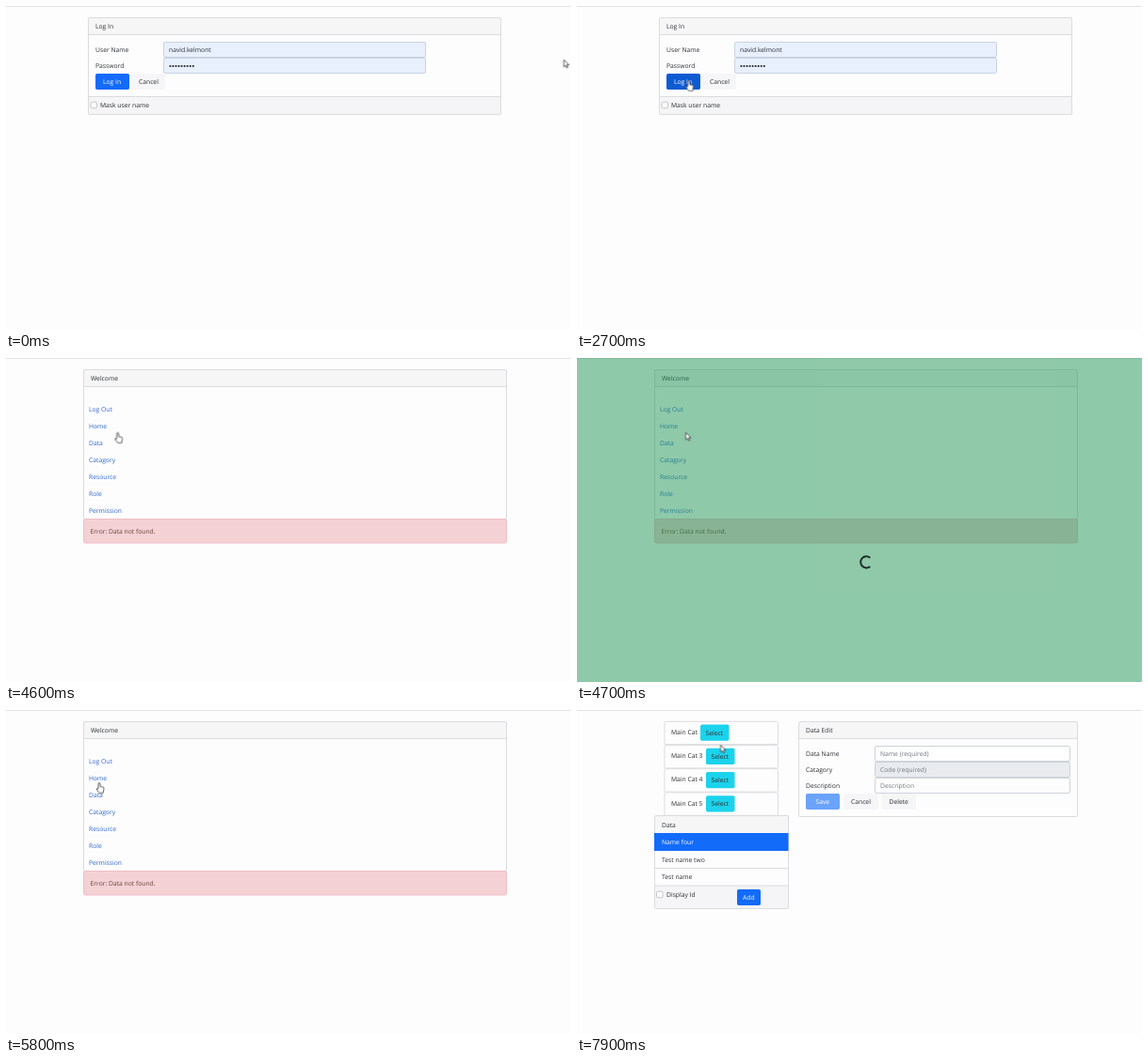
Recreate the animation shown at these times as an HTML page. Size 600 by 345 pixels, loop 8 s.

```html
<!DOCTYPE html>
<html lang="en">
<head>
<meta charset="utf-8">
<title>Log in and edit data</title>
<style>
html, body { margin: 0; width: 100%; height: 100%; overflow: hidden; background: #fefdfe; }
svg { display: block; width: 100vw; height: 100vh; }
text { font: 6.75px "Open Sans", "Noto Sans", sans-serif; fill: #2b2f33; text-rendering: geometricPrecision; white-space: pre; }

.panel { fill: #fefdfe; stroke: #dcdcdf; }
.bar { fill: #f6f6f7; stroke: #dcdcdf; }
.foot { fill: #f5f4f6; stroke: #dcdcdf; }
.input { fill: #fefdfe; stroke: #ced3d9; }
.filled { fill: #e8f0fd; stroke: #c9d3e2; }
.locked { fill: #e9ebef; stroke: #ced3d9; }
.check { fill: #fff; stroke: #c4c4c8; }
.primary { fill: #136bfa; }
.faded { fill: #6ba3fb; }
.info { fill: #1cd3ec; }
.light { fill: #f6f6f8; }
.on { fill: #fff; }
.hint text { fill: #747a82; }
.links text { fill: #2f68cc; }
.alert { fill: #f3d1d5; stroke: #efbfc5; }
.alert-text { fill: #694235; }

/* One percent of the loop is 80 ms. */
.timed { animation: 8s step-end infinite; }
#login { animation-name: login; }
#hover { animation-name: hover; }
#welcome { animation-name: welcome; }
#loading { animation-name: loading; }
#data { animation-name: data; }
#arrow { animation-name: arrow; }
#hand { animation-name: hand; }
#pointer { animation: move 8s step-end infinite; }

@keyframes login { 0% { opacity: 1 } 56.25%, 100% { opacity: 0 } }
@keyframes hover { 0% { fill: #136bfa } 33.75%, 100% { fill: #0d5bd3 } }
@keyframes welcome { 0% { opacity: 0 } 56.25% { opacity: 1 } 81.25%, 100% { opacity: 0 } }
@keyframes loading { 0% { opacity: 0 } 58.75% { opacity: 1 } 60%, 100% { opacity: 0 } }
@keyframes data { 0% { opacity: 0 } 81.25%, 100% { opacity: 1 } }
@keyframes arrow {
  0% { opacity: 1 } 1.25% { opacity: 0 }
  25% { opacity: 1 } 33.75% { opacity: 0 }
  58.75% { opacity: 1 } 60% { opacity: 0 }
  81.25%, 100% { opacity: 1 }
}
@keyframes hand {
  0% { opacity: 0 } 33.75% { opacity: 1 }
  58.75% { opacity: 0 } 60% { opacity: 1 }
  81.25%, 100% { opacity: 0 }
}
@keyframes move {
  0% { transform: translate(592.4px, 57.2px) }
  25% { transform: translate(501px, 121px); animation-timing-function: steps(7) }
  33.75% { transform: translate(118.6px, 79.6px) }
  58.75% { transform: translate(115.5px, 79.4px) }
  60% { transform: translate(118.6px, 79.6px); animation-timing-function: steps(8) }
  70% { transform: translate(106px, 55px); animation-timing-function: steps(4) }
  75% { transform: translate(92px, 100px); animation-timing-function: steps(4) }
  80% { transform: translate(100.5px, 87.3px) }
  81.25% { transform: translate(100.5px, 87.3px); animation-timing-function: steps(9) }
  92.5% { transform: translate(326px, 199px); animation-timing-function: steps(5) }
  98.75%, 100% { transform: translate(152.5px, 37.3px) }
}
</style>
</head>
<body>
<svg viewBox="0 0 600 345" preserveAspectRatio="none">
  <rect width="600" height="345" fill="#fefdfe"/>
  <rect width="600" height="1" fill="#e3e2e5"/>

  <g id="login" class="timed">
    <rect class="panel" x="87.5" y="12.5" width="438" height="103" rx="1.5"/>
    <rect class="bar" x="87.5" y="12.5" width="438" height="18" rx="1.5"/>
    <rect class="foot" x="87.5" y="96.5" width="438" height="19" rx="1.5"/>
    <text x="95" y="23.9">Log In</text>
    <text x="95" y="49">User Name</text>
    <text x="95" y="66">Password</text>
    <rect class="filled" x="167.5" y="38.5" width="278" height="16" rx="1.5"/>
    <rect class="filled" x="167.5" y="55.5" width="278" height="16" rx="1.5"/>
    <text x="173" y="49">navid.kelmont</text>
    <line x1="174.4" y1="64" x2="199.5" y2="64" stroke="#222" stroke-width="2.1" stroke-linecap="round" stroke-dasharray="0 3.05"/>
    <rect id="hover" class="timed" x="95" y="72" width="36" height="17" rx="1.8"/>
    <text class="on" x="103" y="83">Log In</text>
    <rect class="light" x="133" y="72" width="36" height="17" rx="1.8"/>
    <text x="141" y="83">Cancel</text>
    <rect class="check" x="90" y="102.2" width="6.6" height="6.6" rx="1.5"/>
    <text x="100" y="108.2">Mask user name</text>
  </g>

  <g id="welcome" class="timed">
    <rect class="panel" x="82.5" y="12.5" width="449" height="159" rx="1.5"/>
    <rect class="bar" x="82.5" y="12.5" width="449" height="18" rx="1.5"/>
    <text x="90" y="23.9">Welcome</text>
    <g class="links">
      <text x="88" y="56.7">Log Out</text>
      <text x="88" y="74.7">Home</text>
      <text x="88" y="92.7">Data</text>
      <text x="88" y="110.7">Catagory</text>
      <text x="88" y="128.7">Resource</text>
      <text x="88" y="146.7">Role</text>
      <text x="88" y="164.7">Permission</text>
    </g>
    <rect class="alert" x="82.5" y="171.5" width="449" height="25.5" rx="1.5"/>
    <text class="alert-text" x="89.5" y="186.9">Error: Data not found.</text>
  </g>

  <g id="loading" class="timed">
    <rect width="600" height="345" fill="rgb(32 150 86)" fill-opacity=".5"/>
    <path d="M311.3 212.7a6.1 6.1 0 1 0 0 9.2" fill="none" stroke="#1d2f27" stroke-width="2"/>
  </g>

  <g id="data" class="timed">
    <g id="categories"></g>

    <rect class="panel" x="82.5" y="112.5" width="142" height="99" rx="1.5"/>
    <rect class="bar" x="82.5" y="112.5" width="142" height="19" rx="1.5"/>
    <rect class="foot" x="82.5" y="187" width="142" height="24.5" rx="1.5"/>
    <text x="90" y="124.6">Data</text>
    <rect class="primary" x="82" y="131" width="142.5" height="19"/>
    <text class="on" x="90" y="143.4">Name four</text>
    <text x="90" y="161.8">Test name two</text>
    <path d="M83 168.5H224" stroke="#dcdcdf"/>
    <text x="90" y="180.2">Test name</text>
    <rect class="check" x="84.5" y="193.2" width="6.6" height="6.6" rx="1.5"/>
    <text x="95" y="199.1">Display Id</text>
    <rect class="primary" x="170" y="191" width="25" height="17" rx="1.8"/>
    <text class="on" x="176" y="202.2">Add</text>

    <rect class="panel" x="235.5" y="12.5" width="296" height="101" rx="1.5"/>
    <rect class="bar" x="235.5" y="12.5" width="296" height="18" rx="1.5"/>
    <text x="243" y="23.9">Data Edit</text>
    <text x="243" y="49">Data Name</text>
    <text x="243" y="66">Catagory</text>
    <text x="243" y="83">Description</text>
    <rect class="input" x="316.5" y="38.5" width="207" height="16" rx="1.5"/>
    <rect class="locked" x="316.5" y="55.5" width="207" height="16" rx="1.5"/>
    <rect class="input" x="316.5" y="72.5" width="207" height="16" rx="1.5"/>
    <g class="hint">
      <text x="322" y="49">Name (required)</text>
      <text x="322" y="66">Code (required)</text>
      <text x="322" y="83">Description</text>
    </g>
    <rect class="faded" x="243" y="89" width="36" height="17" rx="1.8"/>
    <rect class="light" x="283" y="89" width="37" height="17" rx="1.8"/>
    <rect class="light" x="323.5" y="89" width="36.5" height="17" rx="1.8"/>
    <text class="on" x="253.5" y="100">Save</text>
    <text x="291" y="100">Cancel</text>
    <text x="331.5" y="100">Delete</text>
  </g>

  <g id="pointer" stroke="#3a3a3e" stroke-width=".8" stroke-linejoin="round" fill="#fff">
    <path id="arrow" class="timed" d="M0 0V7.6L1.8 6 3 8.7 4.3 8.1 3.1 5.5H5.5Z"/>
    <path id="hand" class="timed" d="M-1 .9A1 1 0 0 1 1 .9V4L4 4.6Q5.2 4.9 5 6.3L4.2 10.8H0L-2.8 7Q-3 5.8-1.8 5.9L-1 6.6Z"/>
  </g>
</svg>
<script>
const categories = ["Main Cat", "Main Cat 3", "Main Cat 4", "Main Cat 5"];
document.getElementById("categories").innerHTML = categories.map((name, i) => {
  const top = 12 + i * 25.2;
  const left = i ? 137 : 131;
  return `<rect class="panel" x="93" y="${top + .3}" width="120.5" height="24.4" rx="1"/>
    <text x="100" y="${top + 14}">${name}</text>
    <rect class="info" x="${left}" y="${top + 3.6}" width="30.5" height="17.2" rx="1.8"/>
    <text x="${left + 5.5}" y="${top + 14.8}">Select</text>`;
}).join("");
</script>
</body>
</html>
```
